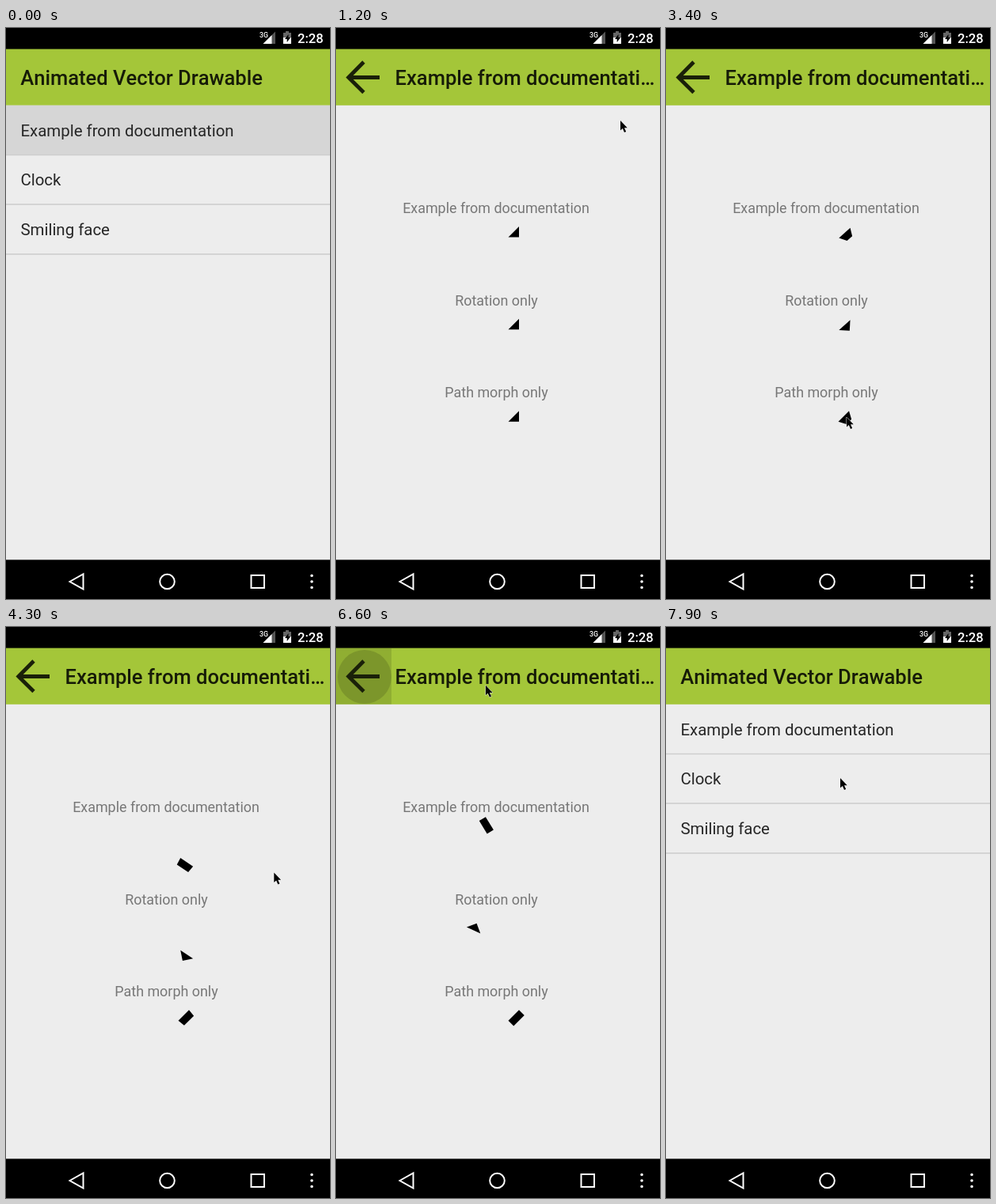
Animation, 409 px wide and 722 px high, one loop 8000 ms. Source, as an HTML page:

```html
<!DOCTYPE html>
<html lang="en">
<head>
<meta charset="utf-8">
<title>Animated Vector Drawable</title>
<style>
  html, body { margin: 0; width: 100%; height: 100%; overflow: hidden; background: #000; }
  svg { display: block; width: 409px; height: 722px; font-family: Roboto, "Noto Sans", sans-serif; }
  .title { font-size: 25.56px; font-weight: 500; font-kerning: none; fill: #161b08; }
  .row { font-size: 20.45px; fill: #262626; }
  .label { font-size: 17.9px; fill: #777; text-anchor: middle; }
  .status { font-weight: 500; fill: #fff; }
  .line { fill: none; stroke: #fff; stroke-width: 2; }
</style>
</head>
<body>
<svg viewBox="0 0 409 722">
  <rect width="409" height="722" fill="#000"/>
  <rect y="27" width="409" height="645.4" fill="#ededed"/>
  <rect y="26.6" width="409" height="71.2" fill="#a4c639"/>

  <!-- status bar -->
  <text class="status" x="320" y="12" font-size="8.8">3G</text>
  <path d="M340 4.5V20H324.5Z" fill="#555"/>
  <path d="M335.5 9V20H324.5Z" fill="#fff"/>
  <path d="M350 6h3v-2h4v2h3v6h-10z" fill="#666"/>
  <path d="M350 12h10v8h-10z" fill="#fff"/>
  <path d="M356.5 8l-4.5 6h2.700v4l4.500-6h-2.700z" fill="#000"/>
  <text class="status" x="368" y="18.7" font-size="16.6">2:28</text>

  <g id="list">
    <rect id="press" y="97.8" width="409" height="62.2" fill="#d6d6d6"/>
    <text class="title" x="18.2" y="72.4">Animated Vector Drawable</text>
    <text class="row" x="18.4" y="136.5">Example from documentation</text>
    <text class="row" x="18.4" y="199.3">Clock</text>
    <text class="row" x="18.4" y="262">Smiling face</text>
    <path d="M0 160.500H409M0 223H409M0 286H409" stroke="#cdcdcd" stroke-width="1.3"/>
  </g>

  <g id="detail">
    <g id="ripple">
      <rect y="27" width="70" height="70.8" opacity=".12"/>
      <circle id="spot" cx="36" cy="63" opacity=".14"/>
    </g>
    <path d="M55 62.500H17M35 43L15.800 62.500L35 81.500" fill="none" stroke="#1a2009" stroke-width="4.8"/>
    <text class="title" x="74.5" y="72.4">Example from documentati…</text>
    <text class="label" x="202" y="234">Example from documentation</text>
    <text class="label" x="202.5" y="350.5">Rotation only</text>
    <text class="label" x="202.5" y="467">Path morph only</text>
    <path id="both"/>
    <path id="spin"/>
    <path id="morph"/>
  </g>

  <!-- navigation bar -->
  <path class="line" d="M80.500 700L97.500 690.500V709.500Z"/>
  <circle class="line" cx="203.5" cy="700" r="9.3"/>
  <path class="line" d="M309.500 692h16.500v16h-16.500z"/>
  <path d="M386 692.500v0M386 700v0M386 707.500v0" stroke="#fff" stroke-width="3.6" stroke-linecap="round"/>

  <path id="cursor" d="M0 0V12.500L2.800 10L5 15L7.200 14L5 9.200H8.800Z" stroke="#fff" stroke-width=".9" paint-order="stroke"/>
</svg>
<script>
const LOOP = 8000, STEP = 100;
const READY = 300, OPEN = 1200, PLAY = 2000, PRESS = 6200, CLOSE = 7200;
const ROTATION = 6000, MORPH = 3000;
const HOME = [359, 117];
// Eased pointer strokes, each a quadratic curve from where the last one ended
const STROKES = [
  { start: 1300, end: 2800, bend: [209, 272], to: [228, 492] },
  { start: 3400, end: 4700, bend: [345, 470], to: [343, 209] },
  { start: 4700, end: 5700, bend: [379, 183], to: [46, 70] },
  { start: 6200, end: 7400, bend: [398, 60], to: [220, 191] }
];

const el = id => document.getElementById(id);
const clamp = v => Math.min(1, Math.max(0, v));
const ease = v => (1 - Math.cos(Math.PI * clamp(v))) / 2;
// The recorded drawables run slightly faster than the stage
const clock = time => Math.max(0, (time - 2064) * 1.07);
const angle = time => time < PLAY ? 45 : 360 * ease(clock(time) / ROTATION);

function pointer(time) {
  let from = HOME;
  for (const { start, end, bend, to } of STROKES) {
    if (time < start) break;
    const f = ease((time - start) / (end - start)), g = 1 - f;
    const at = from.map((v, i) => g * g * v + 2 * f * g * bend[i] + f * f * to[i]);
    if (time < end) return at;
    from = to;
  }
  return from;
}

// Triangle to rectangle in a 600-unit viewport, turned about its centre
function shape(id, cy, degrees, amount) {
  const scale = 0.1363, d = 70 * amount;
  const cos = Math.cos(degrees * Math.PI / 180) * scale;
  const sin = Math.sin(degrees * Math.PI / 180) * scale;
  const points = [[0, -300], [70, -230 - d], [70, -230 + d], [0, -160]];
  const path = points.map(([x, y]) => [202.1 + x * cos - y * sin, cy + x * sin + y * cos]);
  el(id).setAttribute("d", "M" + path.join("L") + "Z");
}

function draw(time) {
  const detail = time >= OPEN && time < CLOSE;
  el("list").style.display = detail ? "none" : "";
  el("detail").style.display = detail ? "" : "none";
  el("press").style.opacity = time < READY ? 1 : time < OPEN ? clamp((time - 900) / 200) : 0;

  const amount = ease(clock(time) / MORPH);
  shape("both", 280, angle(time), amount);
  shape("spin", 396.6, angle(Math.min(time, 6100)), 0);
  shape("morph", 513.2, 45, amount);

  const grow = clamp((time - PRESS) / 300);
  el("ripple").style.opacity = grow;
  el("spot").setAttribute("r", 34 * grow);

  el("cursor").style.display = time < READY ? "none" : "";
  el("cursor").setAttribute("transform", `translate(${pointer(time)})`);
}

const begin = performance.now();
function tick() {
  const time = (performance.now() - begin) % LOOP;
  draw(Math.floor(time / STEP) * STEP);
  requestAnimationFrame(tick);
}
tick();
</script>
</body>
</html>
```
